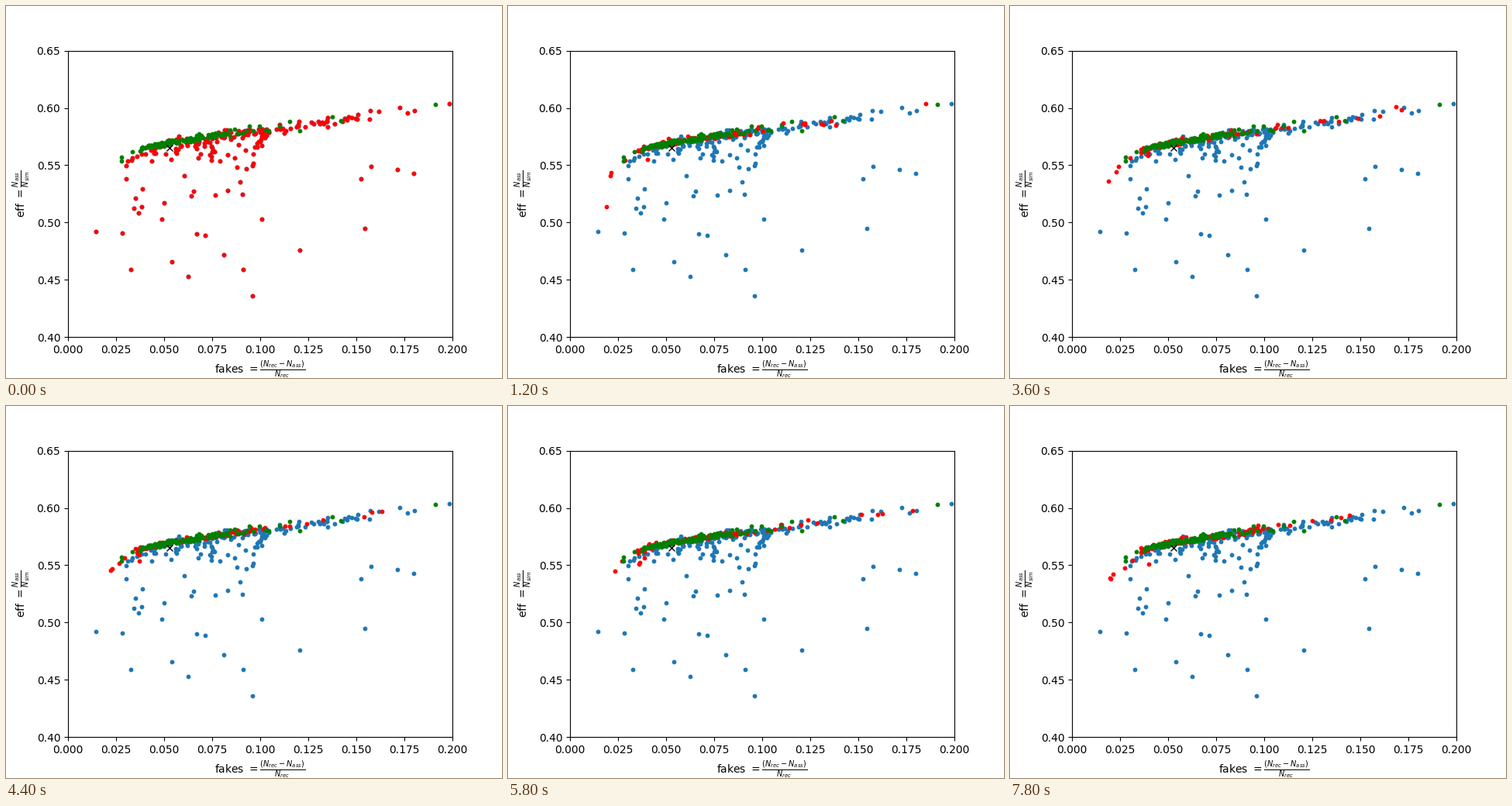
A matplotlib script for the animation above (8000 ms loop, 640 by 480 pixels).

```python
import numpy as np
import matplotlib.pyplot as plt
from matplotlib.animation import FuncAnimation

FRAMES, INTERVAL = 40, 200

# Isolated (fakes, eff) points far from the dense cloud
LONE = [
    (0.0145, 0.492), (0.0283, 0.491), (0.0327, 0.459), (0.0384, 0.514),
    (0.0488, 0.503), (0.0540, 0.466), (0.0625, 0.453), (0.0670, 0.490),
    (0.0714, 0.489), (0.0810, 0.472), (0.0911, 0.459), (0.0960, 0.436),
    (0.1206, 0.476), (0.1008, 0.503), (0.1544, 0.495), (0.1525, 0.538),
    (0.1577, 0.549), (0.1714, 0.546), (0.1798, 0.543), (0.1985, 0.604),
]
FRONT_ENDS = [
    (0.0280, 0.557), (0.0280, 0.554), (0.0333, 0.562), (0.0942, 0.584),
    (0.1100, 0.584), (0.1153, 0.588), (0.1206, 0.580), (0.1375, 0.592),
    (0.1419, 0.589), (0.1911, 0.603),
]


def edge(x):
    """Best efficiency reachable at a given fake rate."""
    return 0.5583 + 0.23 * x - 0.009 * np.exp((0.028 - x) / 0.009)


def along(x, offset):
    return np.column_stack([x, edge(x) + offset])


def band(rng, n, lo, hi, spread):
    x = lo + (hi - lo) * rng.beta(1.1, 1.4, n)
    return along(x, rng.normal(0, spread, n))


def first_cloud(rng):
    below = rng.uniform(0.046, 0.104, 65)
    left = rng.uniform(0.029, 0.047, 12)
    deep = rng.uniform(0.028, 0.125, 18)
    tail = 0.09 + 0.1 * rng.beta(0.9, 1.7, 52)
    return np.vstack([
        LONE,
        along(below, -0.002 - rng.exponential(0.007, 65)),
        along(left, -0.003 - rng.exponential(0.006, 12)),
        along(deep, -rng.uniform(0.02, 0.06, 18)),
        along(tail, rng.normal(-0.001, 0.002, 52)),
        band(rng, 35, 0.036, 0.1, 0.0015),
    ])


def swarm(step):
    if step == 0:
        return start
    rng = np.random.default_rng(100 + step)
    early = 1 + 3 * np.exp(-step / 2)
    left = rng.uniform(0.018, 0.041, 6)
    right = np.minimum(0.092 + rng.exponential(0.03, 13), 0.185)
    return np.vstack([
        band(rng, 75, 0.035, 0.095, 0.0012),
        along(left, -rng.exponential(0.006 * early, 6)),
        along(right, rng.normal(0, 0.0018 * early, 13)),
    ])


rng = np.random.default_rng(4)
start = first_cloud(rng)
front = np.vstack([FRONT_ENDS, band(rng, 115, 0.037, 0.085, 0.001),
                   band(rng, 10, 0.08, 0.105, 0.0018)])

fig, ax = plt.subplots(figsize=(6.4, 4.8), dpi=100)
ax.set(xlim=(0, 0.2), ylim=(0.4, 0.65))
ax.set_xlabel(r"fakes $= \frac{(N_{rec} - N_{ass})}{N_{rec}}$")
ax.set_ylabel(r"eff $= \frac{N_{ass}}{N_{sim}}$")

ax.scatter(*start.T, s=10, color="C0")
particles = ax.scatter(*start.T, s=10, color="red")
ax.scatter(*front.T, s=10, color="green")
ax.plot(0.0528, 0.5653, "x", color="black")


def draw(step):
    particles.set_offsets(swarm(step))
    return (particles,)


anim = FuncAnimation(fig, draw, frames=FRAMES, interval=INTERVAL, repeat=True, repeat_delay=0)
plt.show()
```
